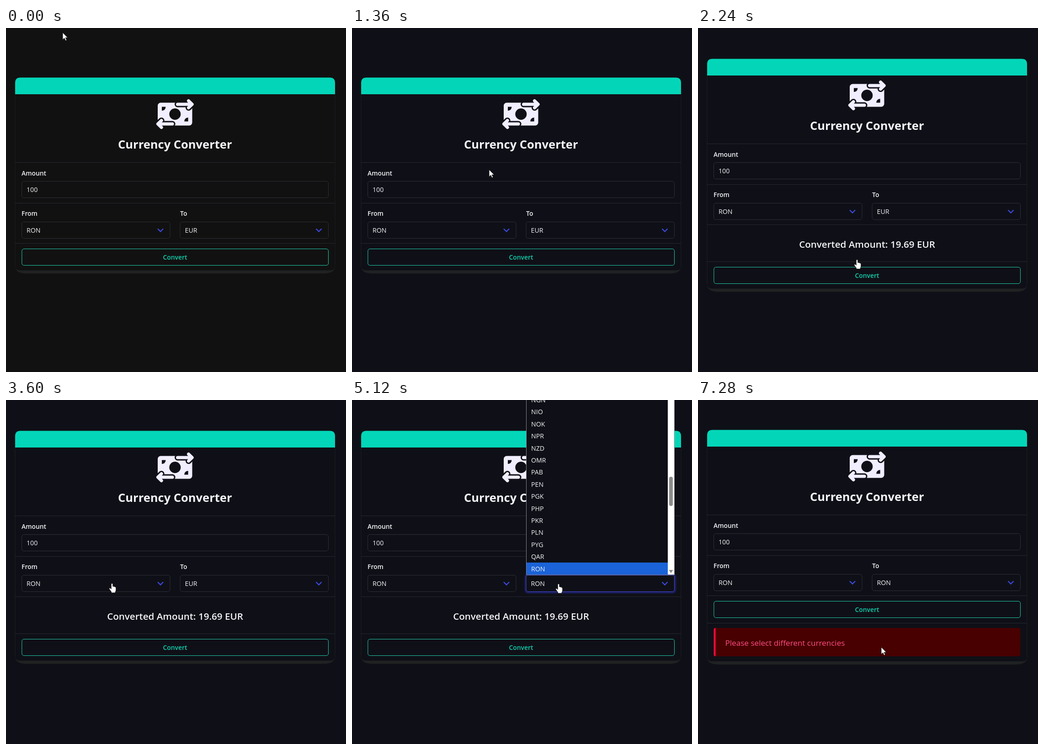
These frames come from a looping animation (744x753 px, 8000 ms). An HTML page:

```html
<!DOCTYPE html>
<html lang="en">
<head>
<meta charset="utf-8">
<title>Currency Converter</title>
<style>
  :root { --bg: #0f1017; --text: #f3f3f8; --teal: #03d6b8; }
  html, body { margin: 0; width: 100%; height: 100%; overflow: hidden; background: var(--bg); }
  svg { display: block; width: 744px; height: 753px; }
  text { font: 400 14.2px "Open Sans", "Noto Sans", sans-serif; fill: var(--text); }
  .title { font-size: 25.5px; font-weight: 700; }
  .label { font-size: 13.9px; font-weight: 600; }
  .result { font-size: 20.6px; font-weight: 600; }
  .alert { font-size: 17.1px; fill: #ff4d80; }
  .mid { text-anchor: middle; }
  .bg { fill: var(--bg); }
  .ink { fill: #f0eeff; }
  .line { stroke: #27282f; }
  .field { fill: var(--bg); stroke: #2d2e37; }
  .focus { stroke: #474bd6; }
  .glow { fill: none; stroke: #2b33c8; stroke-opacity: .38; stroke-width: 4; }
  .chevron { fill: none; stroke: #3c48dc; stroke-width: 2.4; }
  .button { fill: none; stroke: #1fcdac; }
  .button.hover { stroke: var(--teal); stroke-width: 2; }
  .stroke { fill: none; stroke-linecap: round; stroke-linejoin: round; }
  .cursor { fill: #fff; stroke: #111; stroke-width: .9; stroke-linejoin: round; }
</style>
</head>
<body>
<svg viewBox="0 0 744 753">
  <defs>
    <path id="arrow" d="M375.500 167H406M399.500 159.500L407.200 167L399.500 174.500"/>
    <g id="swap">
      <use href="#arrow" class="stroke" stroke="var(--bg)" stroke-width="13"/>
      <use href="#arrow" class="stroke" stroke="#f0eeff" stroke-width="7"/>
      <path class="bg" d="M341 172.500H349.500Q349 180.500 341 181Z"/>
    </g>
    <path id="chevron" class="chevron" d="M-6 -3L0 3L6 -3"/>
  </defs>

  <g id="card">
    <path id="shadow" fill="#202122"/>
    <path id="panel" class="bg"/>
    <path id="sides" fill="none" stroke="#1d1e24"/>
    <path fill="var(--teal)" d="M20 145V120Q20 108.500 31.500 108.500H708.500Q720 108.500 720 120V145Z"/>

    <rect class="ink" x="332" y="163.500" width="75.500" height="50" rx="6.500"/>
    <circle class="bg" cx="369.800" cy="188.500" r="12.500"/>
    <use href="#swap"/>
    <use href="#swap" transform="rotate(180 369.800 188.500)"/>
    <text class="title mid" x="369.800" y="263.500">Currency Converter</text>

    <path class="line" d="M20 294.500H720M20 383.500H720M20 471.500H720"/>
    <text class="label" x="34" y="322.500">Amount</text>
    <rect class="field" x="34.500" y="335.500" width="671" height="36" rx="4.500"/>
    <text x="45" y="359">100</text>

    <text class="label" x="34" y="411">From</text>
    <rect class="field" x="34.500" y="424.500" width="324.500" height="36" rx="4.500"/>
    <text x="45" y="447.700">RON</text>
    <use href="#chevron" x="338" y="442.500"/>

    <text class="label" x="381" y="411">To</text>
    <rect id="glow" class="glow" x="379.500" y="422.500" width="328" height="40" rx="6"/>
    <rect id="toField" class="field" x="381" y="424.500" width="324.500" height="36" rx="4.500"/>
    <text id="toValue" x="391.500" y="447.700"></text>
    <use href="#chevron" x="684.500" y="442.500"/>

    <g id="result">
      <text class="result mid" x="370" y="521.500">Converted Amount: 19.69 EUR</text>
      <path class="line" d="M20 552.500H720"/>
    </g>
    <g id="action">
      <rect id="button" class="button" x="34.800" y="483.500" width="670.700" height="36" rx="4.500"/>
      <text class="label mid" x="370" y="507" style="fill:#0fd3b0">Convert</text>
    </g>
    <g id="alert">
      <path class="line" d="M20 531.500H720"/>
      <rect x="34.500" y="542" width="671" height="62" rx="4" fill="#480001"/>
      <path d="M38.500 542V604Q34.500 604 34.500 600V546Q34.500 542 38.500 542Z" fill="#f00a3c"/>
      <text class="alert" x="59.500" y="581">Please select different currencies</text>
    </g>
  </g>

  <g id="menu">
    <rect class="bg" x="381.500" y="-5" width="324" height="387.700" stroke="#85868c"/>
    <rect x="382" y="355.800" width="309" height="26.400" fill="#1a63d8"/>
    <g id="options"></g>
    <rect x="691" y="-5" width="14" height="387" fill="#fff"/>
    <rect id="thumb" x="694" width="8" height="64" rx="4" fill="#8b8b8b"/>
    <path d="M693.500 372H702.500L698 379Z" fill="#8b8b8b"/>
  </g>

  <path id="pointer" class="cursor" d="M0 0V15.500L3.700 12.200L6.300 17.800L8.700 16.700L6.200 11.200H11Z"/>
  <path id="hand" class="cursor" d="M-1.800 1.700a1.800 1.800 0 0 1 3.600 0V6.600q1.600-.8 2.700.5q1.500-.6 2.300.7q1.900-.1 1.900 1.900V14q0 3-1.600 4.600V20.500H-1.500V18.500L-5.800 12.400q-.8-1.700.6-2.300q1.200-.3 2.300 1l1.100 1.200Z"/>
</svg>

<script>
const LOOP = 8000, STEP = 80;
const OPEN = 4240, PICK = 4960, CLOSE = 5280, RESULT = 2240, ERROR = 6320;
const LISTS = {
  EUR: 'CLP CNY COP CRC CUP CVE CZK DJF DKK DOP DZD EGP ERN ETB EUR',
  RON: 'NGN NIO NOK NPR NZD OMR PAB PEN PGK PHP PKR PLN PYG QAR RON'
};

// Pointer path: time, x, y
const PATH = [
  [0, 124, 10], [240, 124, 10], [400, 121, 9], [560, 117, 1], [640, 114, -26],
  [800, 190, -26], [1360, 300, 310], [1760, 346, 496], [2000, 350, 512],
  [2160, 350, 512], [2240, 348, 507], [3520, 348, 507], [3600, 232, 401.5],
  [4160, 440, 402], [4400, 452, 402.5], [5680, 452, 402.5],
  [6080, 405, 525], [6160, 402, 536], [6320, 401, 541]
];

const $ = id => document.getElementById(id);
const set = (id, attrs) => {
  for (const key in attrs) $(id).setAttribute(key, attrs[key]);
};
const show = (id, on) => { $(id).style.display = on ? '' : 'none'; };

function pointerAt(t) {
  const next = PATH.findIndex(p => p[0] > t);
  if (next < 0) return PATH[PATH.length - 1].slice(1);
  const a = PATH[next - 1], b = PATH[next];
  const k = (t - a[0]) / (b[0] - a[0]);
  return [1, 2].map(i => a[i] + (b[i] - a[i]) * k);
}

function fillMenu(code) {
  $('options').innerHTML = LISTS[code].split(' ').map((name, i) =>
    `<text x="392" y="${374.6 - (14 - i) * 26.4}">${name}</text>`).join('');
  set('thumb', { y: code === 'EUR' ? -60 : 168 });
}

function layout(bottom) {
  const low = bottom + 7;
  set('shadow', { d: `M20 ${bottom - 8}Q21 ${low} 46 ${low}H694Q719 ${low} 720 ${bottom - 8}Z` });
  set('panel', { d: `M20 140V${bottom - 10}Q20 ${bottom} 31 ${bottom}H709Q720 ${bottom} 720 ${bottom - 10}V140Z` });
  set('sides', { d: `M20 145V${bottom - 8}M720 145V${bottom - 8}` });
}

function draw(time) {
  const t = Math.floor(time % LOOP / STEP) * STEP;
  const failed = t >= ERROR, converted = t >= RESULT && !failed;
  const code = t < PICK ? 'EUR' : 'RON';
  const lift = failed ? -43 : converted ? -41 : 0;
  const drop = converted ? 81 : 0;
  const open = t >= OPEN && t < CLOSE;
  const focused = t >= OPEN && !failed;
  const [x, y] = pointerAt(t);

  document.documentElement.style.setProperty('--bg', t < STEP ? '#111111' : '#0f1017');
  set('card', { transform: `translate(0 ${lift})` });
  set('action', { transform: `translate(0 ${drop})` });
  layout(failed ? 615 : 530.5 + drop);
  show('result', converted);
  show('alert', failed);
  show('glow', focused);
  $('toField').classList.toggle('focus', focused);
  $('toValue').textContent = code;
  show('menu', open);
  if (open) fillMenu(code);

  const localY = y - lift;
  const onButton = x > 34 && x < 706 && localY >= 483 + drop && localY <= 520 + drop;
  const onSelect = localY >= 424 && localY <= 461 && (x < 359 || x > 381);
  const isHand = onButton || onSelect || (t >= RESULT && t < 2640);
  $('button').classList.toggle('hover', onButton);
  show('hand', isHand);
  show('pointer', !isHand);
  set(isHand ? 'hand' : 'pointer', { transform: `translate(${x} ${y})` });
}

const start = performance.now();
function tick() {
  draw(performance.now() - start);
  requestAnimationFrame(tick);
}
tick();
</script>
</body>
</html>
```
